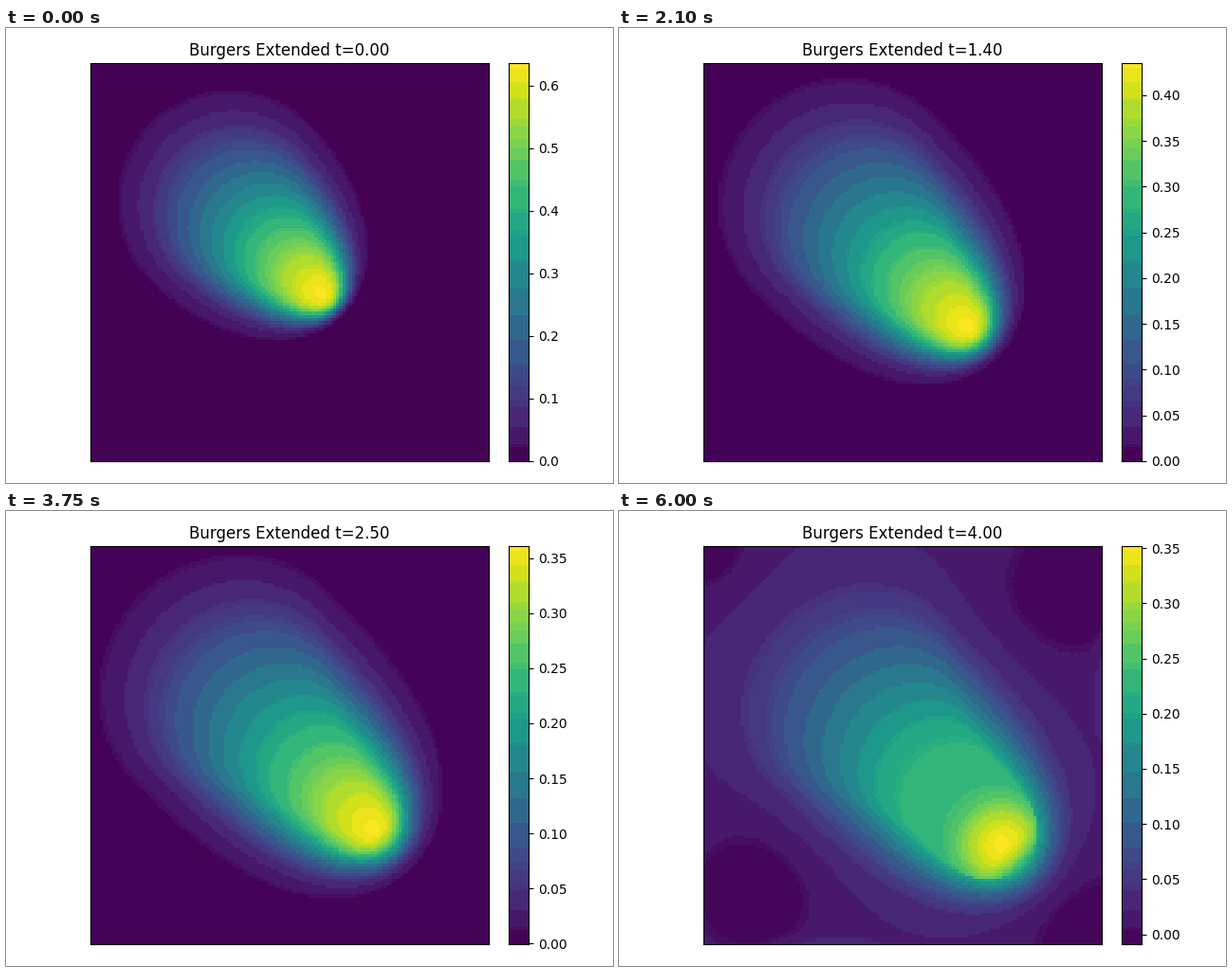
Animation, 640 px wide and 480 px high, one loop 6.03 s. Source, as a matplotlib script:

```python
import matplotlib.pyplot as plt
import numpy as np
from matplotlib.animation import FuncAnimation

W, H = 640, 480
SIDE, CELLS = 420, 128
FRAMES, STEP_MS, DT = 201, 30, 0.02
START = 143  # where the foot of the wave stays on the diagonal

axis = (np.arange(CELLS) + 0.5) * SIDE / CELLS
X, Y = np.meshgrid(axis, axis)
ALONG, ACROSS = (X + Y) / 2, (X - Y) / np.sqrt(2)

VIRIDIS = plt.get_cmap("viridis")(np.arange(256), bytes=True)[:, :3].astype(int)
# Colours that share a coarse RGB cube form one band
CUBES = (VIRIDIS[:, 0] >> 5) * 128 + (VIRIDIS[:, 1] >> 4) * 8 + (VIRIDIS[:, 2] >> 5)
BAND = np.unique(CUBES, return_inverse=True)[1].ravel()


def ramp(t, start, power=2):
    """Eased rise from 0 at start to 1 at the end of the loop."""
    return np.clip((t - start) / (4 - start), 0, 1) ** power


def spot(x, y, rx, ry=None):
    return np.exp(-((X - x) / rx) ** 2 / 2 - ((Y - y) / (ry or rx)) ** 2 / 2)


DIPS = np.clip(spot(0, 0, 35) + spot(385, 45, 56) + spot(52, 365, 52)
               + spot(420, 420, 58), 0, 1)
EDGES = spot(130, 420, 30, 5) + spot(420, 145, 5, 30)


def limits(t):
    """Value range: the peak decays about as 1/t, then levels off."""
    vmax = 1 / (1.572 + 0.52 * t - 0.03 * max(t - 1, 0) ** 3)
    return -0.009 * ramp(t, 2), vmax


def wave(t):
    """Normalised height: nested egg-shaped level sets, solved by bisection."""
    peak = 243 + 28.5 * t - 2.6 * t * t
    spread = 4150 + 840 * t - 110 * t * t
    front, power = 17 + 3.5 * t, 0.25 + 0.055 * t
    blunt, width = 2 + 0.3 * t, 1 + 0.008 * t * t
    crowd = 147 * ramp(t, 2)

    low, high = np.zeros_like(X), np.ones_like(X)
    for _ in range(10):
        q = (low + high) / 2
        depth = -np.log(q)
        radius = np.sqrt(spread * depth)
        s = np.clip((q - 0.6) / 0.12, 0, 1)
        mid = START + (peak - START) * q + crowd * s * s * (3 - 2 * s) * (1 - q)
        nose = np.sqrt(2) * (peak + front * depth ** power - mid)
        a = np.sqrt(2) * (ALONG - mid)
        reach = np.where(a > 0, np.abs(a / nose) ** blunt, (a / radius) ** 2)
        inside = reach + (ACROSS / (radius * width)) ** 2 < 1
        low, high = np.where(inside, q, low), np.where(inside, high, q)

    drift = ramp(t, 2.3)
    haze = 0.078 * drift * (1 - DIPS) + 0.05 * np.sqrt(drift) * EDGES
    return low + haze * (1 - low) ** 8


def banded(index):
    """Palette in which each band has the mean colour of its pixels."""
    weight = np.bincount(index.ravel(), minlength=256) * (SIDE / CELLS) ** 2 + 34
    total = np.bincount(BAND, weight)
    mean = [np.bincount(BAND, weight * c) / total for c in VIRIDIS.T]
    return np.rint(np.stack(mean, axis=1)[BAND]).astype(np.uint8)


def box(x, y, w, h):
    return [x / W, 1 - (y + h) / H, w / W, h / H]


fig = plt.figure(figsize=(W / 100, H / 100), dpi=100)
ax = fig.add_axes(box(89, 37, SIDE, SIDE))
cax = fig.add_axes(box(530, 37, 21, SIDE))
image = ax.imshow(np.zeros((CELLS, CELLS, 3), np.uint8),
                  interpolation="nearest", aspect="auto")
bar = cax.imshow(np.zeros((256, 1, 3), np.uint8), origin="lower",
                 interpolation="nearest", aspect="auto", extent=(0, 1, 0, 1))
ax.set(xticks=[], yticks=[])
cax.set_xticks([])
cax.yaxis.tick_right()
title = ax.set_title("")


def draw(i):
    t = i * DT
    vmin, vmax = limits(t)
    index = np.clip(wave(t) * 256, 0, 255).astype(int)
    palette = banded(index)
    image.set_data(palette[index])
    bar.set_data(palette[:, None])
    bar.set_extent((0, 1, vmin, vmax))
    cax.set_ylim(vmin, vmax)
    title.set_text(f"Burgers Extended t={t:.2f}")
    return image, bar, title


anim = FuncAnimation(fig, draw, frames=FRAMES, interval=STEP_MS,
                     repeat=True, repeat_delay=0, blit=False)
plt.show()
```
